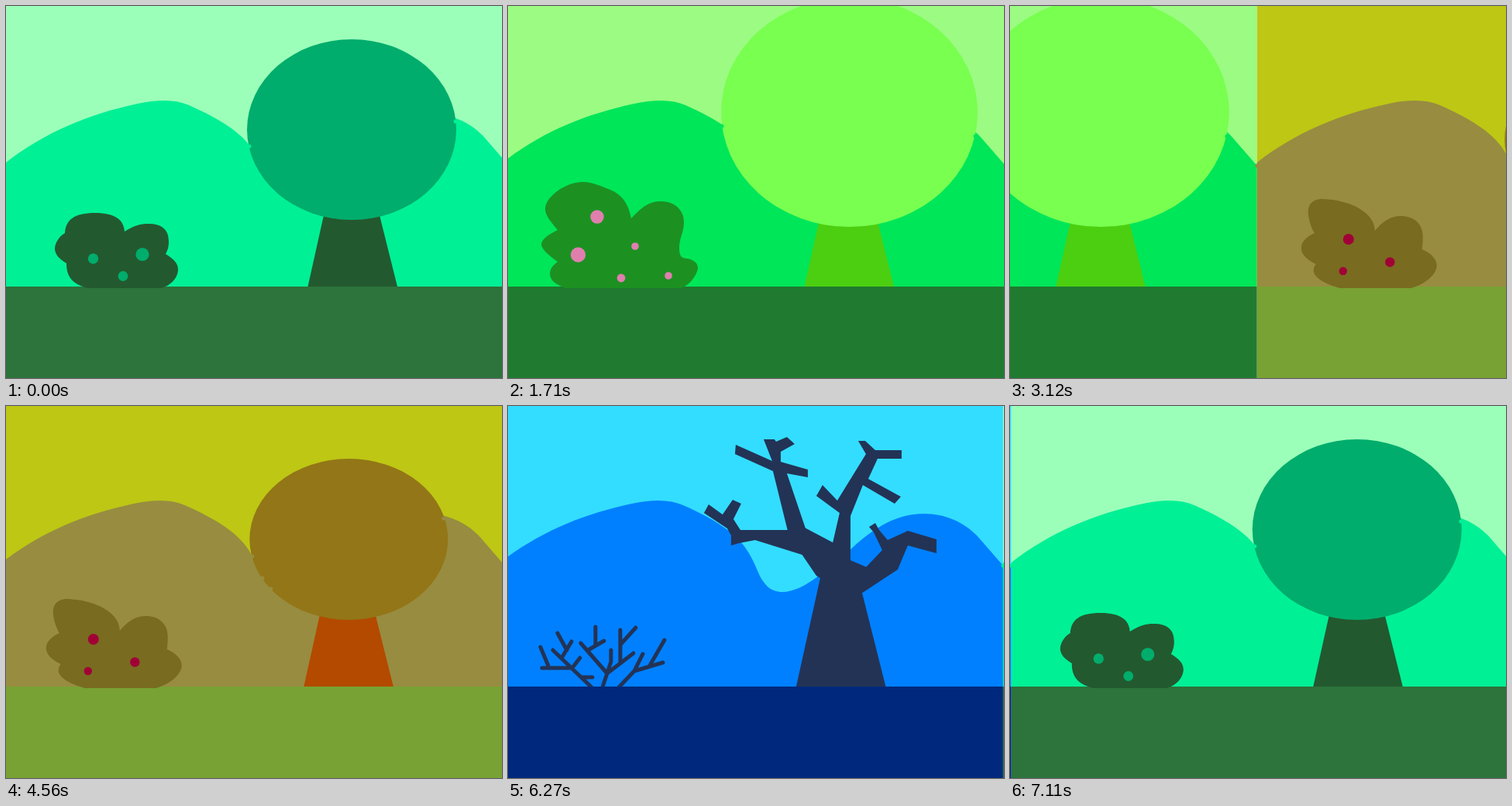
Write an HTML page that moves like this. It is 640 px wide and 480 px high and loops after 7200 ms.

```html
<!DOCTYPE html>
<html lang="en">
<head>
<meta charset="utf-8">
<title>Four seasons</title>
<style>
  html, body { margin: 0; width: 100%; height: 100%; overflow: hidden; }
  svg { display: block; width: 100vw; height: 100vh; }
</style>
</head>
<body>
<svg viewBox="0 0 640 480"><g id="world"></g></svg>
<script>
const LOOP = 7200, STEP = 30, WIDTH = 649, HORIZON = 362;

const hill = `M0 202C50 163 105 140 170 126Q212 117 236 128C275 145 302 163 315 181
  C333 206 330 217 345 233C361 247 385 239 411 219C430 205 440 196 450 187
  C486 153 515 139 547 139C575 139 598 150 615 167L649 206V362H0Z`;

const path = (d, fill, extra = '') => `<path d="${d}" fill="${fill}" ${extra}/>`;
const rect = (y, h, fill) => `<rect y="${y}" width="${WIDTH}" height="${h}" fill="${fill}"/>`;
const dots = (list, fill) =>
  list.map(([x, y, r = 2.5]) => `<circle cx="${x}" cy="${y}" r="${r}" fill="${fill}"/>`).join('');

// Elements common to every season; the plants go before and after the ground.
const scene = (id, x, c, tree, bush) => `<g id="${id}" transform="translate(${x})">
  ${rect(0, HORIZON + 1, c.sky)}${path(hill, c.hill)}${dots([[0, 206], [WIDTH, 207]], c.hill)}
  ${tree}${rect(HORIZON, 480 - HORIZON, c.ground)}${bush}</g>`;

function leafyScene(id, x, c, [cx, cy, rx, ry], notches, bushX, bush, berries) {
  const tree = path('M389.5 362L414 252H477.5L505 362Z', c.trunk) +
    `<ellipse cx="${cx}" cy="${cy}" rx="${rx}" ry="${ry}" fill="${c.crown}"/>` + dots(notches, c.hill);
  const shrub = `<g transform="translate(${bushX})">${path(bush, c.bush)}${dots(berries, c.berry)}</g>`;
  return scene(id, x, c, tree, shrub);
}

const spring = leafyScene('spring', 0,
  { sky: '#9bffb9', hill: '#00f096', ground: '#2d733c', crown: '#00ad6c', trunk: '#23592f', bush: '#23592f', berry: '#00ad6c' },
  [446, 159.5, 135, 116.5], [[314, 181], [580, 149]], 0,
  `M105 364C84 358 78 348 78 332C68 326 63 320 63 313C63 305 70 296 76 293C77 276 88 267 115 267
   C141 267 152 276 153 291C166 283 174 281 183 281C202 281 210 289 210 304C210 312 208 316 206 320
   C217 327 222 332 222 340C222 350 213 361 200 364Z`,
  [[112.5, 326, 6.7], [176, 320.5, 8.6], [151, 348.5, 6.4]]);

const summer = leafyScene('summer', WIDTH,
  { sky: '#9bfb82', hill: '#00e659', ground: '#207a30', crown: '#78ff4f', trunk: '#4ccf10', bush: '#1c9122', berry: '#e07fae' },
  [447.5, 137, 165.5, 148], [[283, 155], [610, 168]], 7,
  `M75 364C62 360 54 354 54 345C55 337 59 334 64 330C53 322 43 314 43 307C44 300 54 294 64 289
   C55 278 48 270 48 262C48 246 75 227 96 227C110 227 121 233 134 238C151 246 156 260 159 274
   C172 260 182 252 197 252C216 252 227 264 227 279C227 292 221 299 221 312C221 323 224 326 232 326
   C241 328 245 332 245 339C243 349 233 361 223 364Z`,
  [[115, 272, 8.7], [90.5, 321, 9.7], [164, 310, 4.8], [146, 351, 5.4], [207, 348, 4.8]]);

const autumn = leafyScene('autumn', 1298,
  { sky: '#bdc714', hill: '#988c40', ground: '#78a233', crown: '#937617', trunk: '#b34a00', bush: '#796b20', berry: '#a10036' },
  [447.5, 172, 128, 104], [[323, 194], [570, 145], [336, 222], [347, 236]], 5,
  `M102 364C84 359 68 351 68 341C68 338 69 335 71 333C58 327 52 320 52 312C52 304 60 297 69 293
   C63 282 61 272 61 265C61 254 69 249 79 249C114 250 147 266 147 290C158 277 168 271 180 271
   C198 271 209 281 209 298C209 306 208 311 208 314C220 319 227 327 227 335C226 348 211 359 194 364Z`,
  [[113, 301, 7], [166.5, 330.5, 6.2], [106, 342, 5.2]]);

const bark = '#233356';
const limbs = [
  'M372 362L403 222L398 219L379 191L361 160L383 157L419 176L442 199L463 208L457 241L487.5 362Z',
  'M383 193L319 173L298 177L288 180V167L283 158L253 138L259 127L277 140L290 121L301 126L291 146L300 160H383Z',
  'M361 161L342 84L293 62L294 50L341 71L330 43H344L346 46L360 40L370 49L352 59V72L387 82V92L360 87L384 158Z',
  'M419 177L428 138L398 116L406 102L425 122L462 62L452 45H461L474 57H508V68H477L465 94L507 117L499 126L458 102L442 142V200Z',
  'M462 208L483 186L472 163L466 156L474 151L479 160L490 173L516 161L553 172V190L516 180L503 211L456 242Z'
];
const twigs = `M42 311L52 335M44 338H83L93 325M58 315L108 363M95 350H109M64 293L76 315M82 304L70 324
  M94 306L128 345L162 319M122 363L128 345L133 330V315M105 314L124 303M113 285V308M145 289V330
  M145 308L165 286M143 363L163 342L200 331M163 342L174 320M183 335L202 302`;
const winter = scene('winter', 1941,
  { sky: '#33ddff', hill: '#0080ff', ground: '#00297d' },
  `<g transform="translate(10)">${limbs.map(d => path(d, bark)).join('')}
   ${path(twigs, 'none', `stroke="${bark}" stroke-width="5" stroke-linecap="round" stroke-linejoin="round"`)}</g>
   ${path('M8 179V190', 'none', 'stroke="#1a70b0" stroke-width="1.5"')}`, '');

const world = document.getElementById('world');
world.innerHTML = spring + summer + winter + autumn + '<use href="#spring" x="2590"/>';

// Symmetric cubic Bezier ease (A, 0, 1 - A, 1), solved by bisection.
const A = 0.69;
function ease(p) {
  if (p <= 0 || p >= 1) return p <= 0 ? 0 : 1;
  let low = 0, high = 1, s;
  for (let i = 0; i < 24; i++) {
    s = (low + high) / 2;
    const x = 3 * s * (1 - s) ** 2 * A + 3 * s * s * (1 - s) * (1 - A) + s ** 3;
    if (x < p) low = s; else high = s;
  }
  return s * s * (3 - 2 * s);
}

// Camera moves: start, end, distance.
const moves = [[930, 1710, 656], [2730, 3510, 646.5], [4530, 5310, 648.5], [6255, 7165, 639]];
const camera = t => moves.reduce((x, [from, to, dist]) => x + dist * ease((t - from) / (to - from)), 0);

function draw() {
  const t = Math.min(Math.floor(performance.now() % LOOP / STEP) * STEP, 7110);
  world.setAttribute('transform', `translate(${-camera(t)})`);
  requestAnimationFrame(draw);
}
draw();
</script>
</body>
</html>
```
